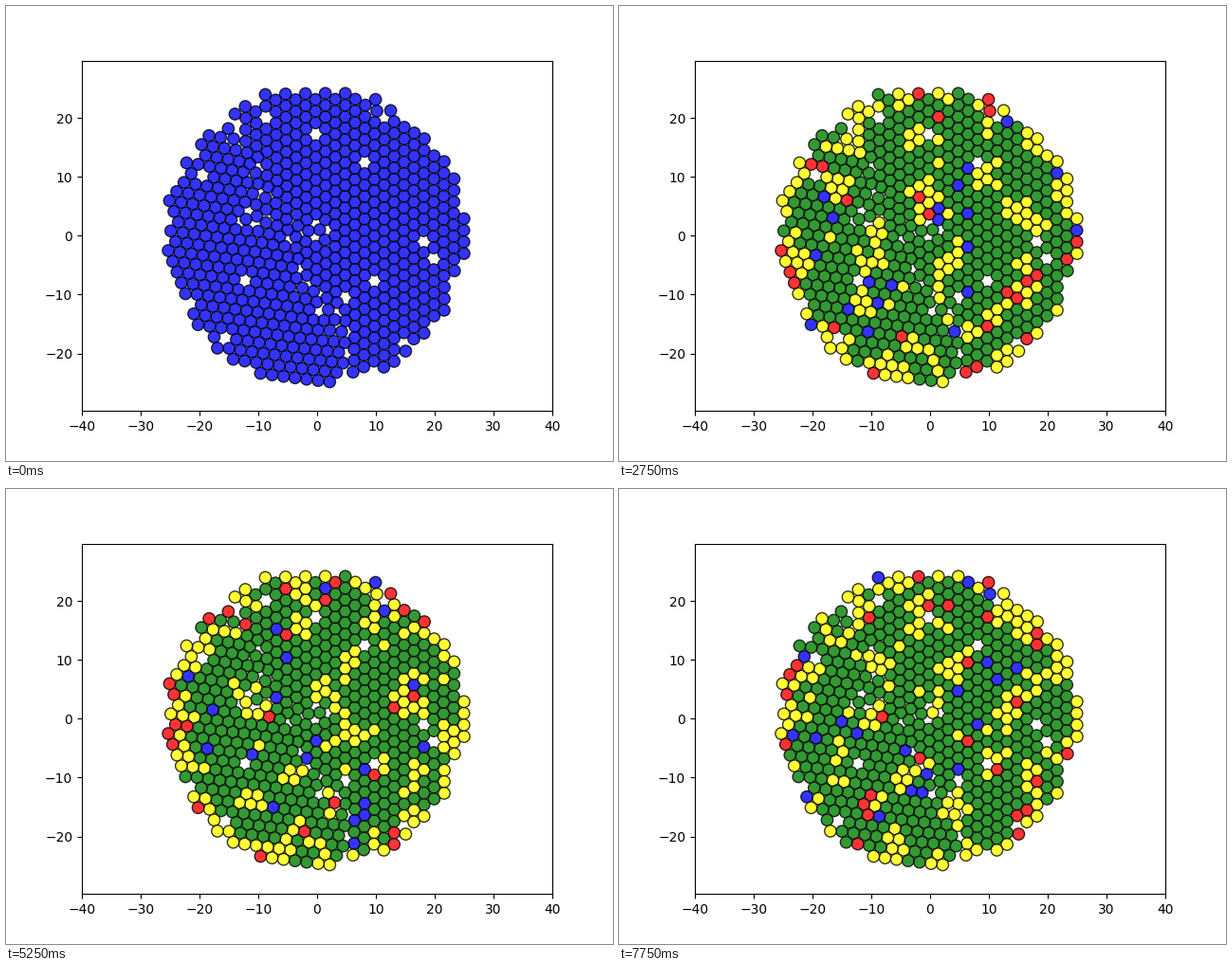
Recreate the animation shown at these times as a matplotlib script. Size 640 by 480 pixels, loop 8000 ms.

```python
import numpy as np
import matplotlib.pyplot as plt
from matplotlib.animation import FuncAnimation
from matplotlib.collections import PatchCollection
from matplotlib.patches import Circle

FRAMES, STEP_MS = 32, 250
COUNT, PITCH = 595, 1.99
CENTRE = np.array([-.3, -.1])
BLUE, RED, YELLOW, GREEN = range(4)
COLORS = np.array(["blue", "red", "yellow", "green"])


def lattice(angle, anchor):
    """Hexagonal grid turned by an angle, with one cell at the anchor."""
    i, j = np.mgrid[-40:41, -40:41].reshape(2, -1)
    z = PITCH * (i + j * np.exp(1j * np.pi / 3)) * np.exp(1j * np.radians(angle))
    return np.column_stack([z.real, z.imag]) + anchor


def radius(pts):
    return np.hypot(*(pts - CENTRE).T)


def relax(pts, steps=260, pull=.0003):
    """Push overlapping cells apart while drawing all to the centre."""
    for _ in range(steps):
        d = pts[:, None] - pts
        dist = np.hypot(d[..., 0], d[..., 1]) + 1e-9
        push = np.where(dist < PITCH, (PITCH - dist) / dist, 0)
        pts = pts + .3 * (d * push[..., None]).sum(1) - pull * (pts - CENTRE)
    return pts


def pack_cells(rng):
    # Upright rows, with a tilted grain at the lower left
    upright, tilted = lattice(90, (-1.9, 18.9)), lattice(-8, (-14.7, -7.7))
    in_tilted = lambda p: p[:, 0] + .5 * p[:, 1] < -5
    pts = np.vstack([upright[~in_tilted(upright)], tilted[in_tilted(tilted)]])
    pts = pts[radius(pts) < 28]
    kept = pts[:1]
    for p in pts[1:]:
        if np.hypot(*(kept - p).T).min() > 1.4:
            kept = np.vstack([kept, p])
    # Leave out a few cells so that small holes remain
    kept = kept[rng.random(len(kept)) > .02]
    kept = kept + rng.normal(0, .2, kept.shape)
    rough = radius(kept) + rng.normal(0, .3, len(kept))
    return relax(kept[np.argsort(rough)[:COUNT]])


rng = np.random.default_rng(5)
cells = pack_cells(rng)
count = len(cells)
x, y = cells.T
rim = 1 / (1 + np.exp(-2 * (radius(cells) - 23.7)))

# Lasting differences between cells, and slow waves across the disc
cell_bias = rng.normal(size=count)
direction = rng.uniform(0, 2 * np.pi, 10)
length = rng.uniform(5, 13, 10)
phase = rng.uniform(0, 2 * np.pi, 10)
speed = rng.uniform(-.9, .9, 10)
along = np.outer(x, np.cos(direction)) + np.outer(y, np.sin(direction))
first_patch = np.exp(-((x - 7) ** 2 + (y + 1) ** 2) / 60)


def sigmoid(t):
    return 1 / (1 + np.exp(-t))


def lowest(score, share):
    mask = np.zeros(count, bool)
    mask[np.argsort(score)[:round(share * count)]] = True
    return mask


def states(k):
    if k == 0:
        return np.full(count, BLUE)
    noise = np.random.default_rng(100 + k)
    red = max(.045, sigmoid(1.8 * (4.1 - k)))
    green = .68 * sigmoid(1.6 * (k - 6.2))
    waves = np.sin(2 * np.pi * along / length + phase + speed * k).sum(1)
    height = (.27 * waves + .25 * cell_bias + .35 * noise.normal(size=count)
              + 2 * first_patch * sigmoid(2 * (8 - k)) - 1.3 * rim)
    low = lowest(height, 1 - green)
    scatter = 1.4 * sigmoid(3 * (k - 5))
    red_score = height + scatter * noise.normal(size=count) + 50 * ~low
    state = np.where(low, YELLOW, GREEN)
    state[lowest(red_score, red)] = RED
    state[noise.choice(count, 20, replace=False)] = BLUE
    return state


fig, ax = plt.subplots(figsize=(6.4, 4.8), dpi=100)
ax.set_xlim(-40, 40)
ax.set_ylim(-29.77, 29.77)
discs = PatchCollection([Circle(c, 1) for c in cells], alpha=.8,
                        edgecolor="black", linewidth=1)
ax.add_collection(discs)


def draw(k):
    discs.set_facecolor(COLORS[states(k)])
    return discs,


anim = FuncAnimation(fig, draw, frames=FRAMES, interval=STEP_MS,
                     repeat=True, repeat_delay=0)
plt.show()
```
